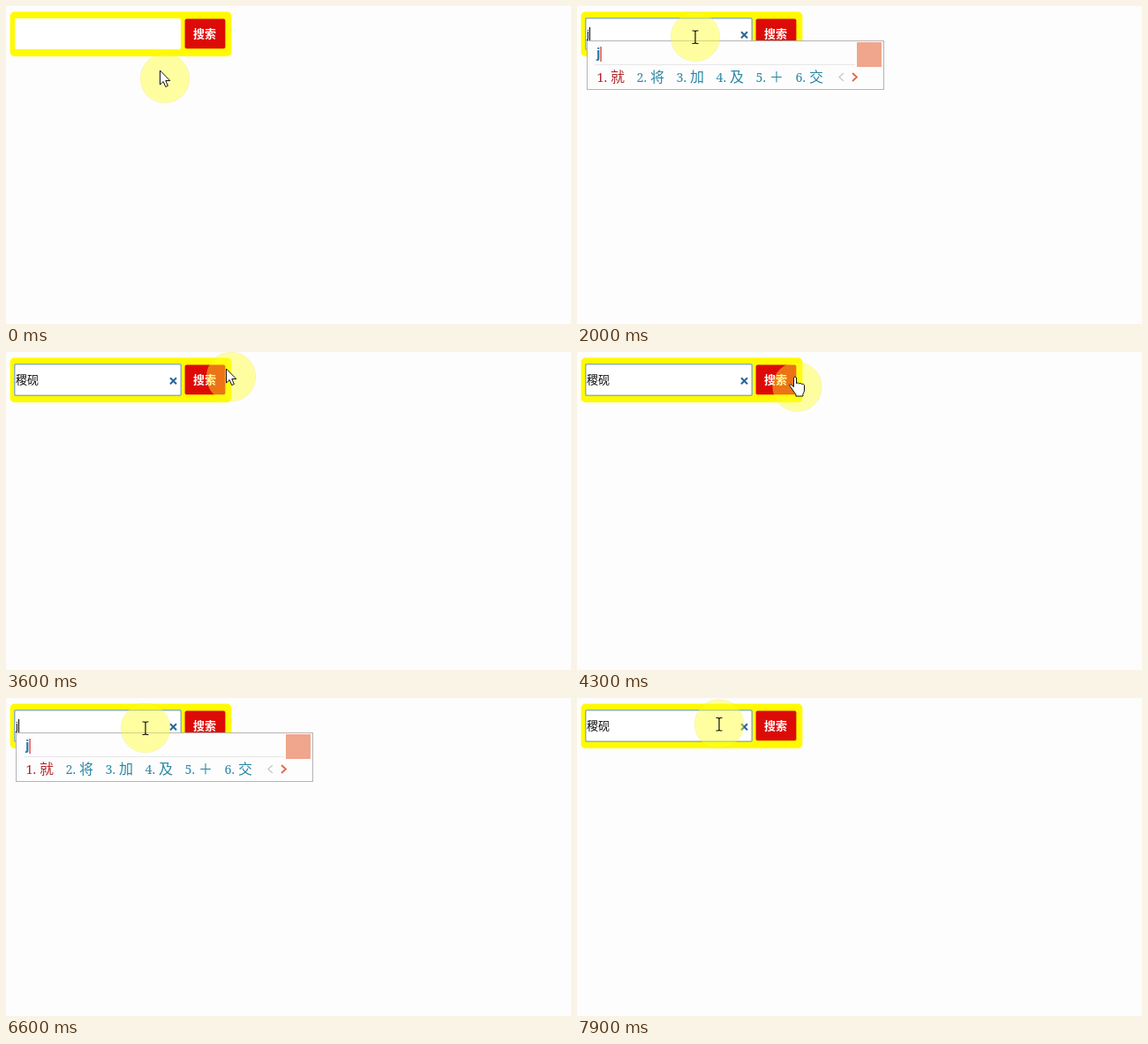
An HTML page that plays this animation: 640 by 360 pixels, repeating every 8 s.

```html
<!DOCTYPE html>
<html lang="zh">
<head>
<meta charset="utf-8">
<style>
  html, body { margin: 0; width: 100%; height: 100%; overflow: hidden; background: #fdfdfd; }
  svg { display: block; width: 100vw; height: 100vh; }
  text { font-family: "Noto Sans CJK SC", "Noto Sans CJK", sans-serif; white-space: pre; }
  .latin { font-family: "Liberation Sans", sans-serif; }
  .num { font-family: "Noto Serif", serif; font-size: 14.3px; }
  .word { font-size: 16px; font-weight: 300; }
</style>
</head>
<body>
<svg viewBox="0 0 640 360">
  <rect width="640" height="360" fill="#fdfdfd"/>
  <rect x="4.6" y="6.6" width="250.8" height="50.4" rx="5" fill="#fffa00"/>
  <rect x="10" y="14" width="188" height="35" rx="2" fill="#fff"/>
  <rect id="focus" x="9.75" y="13.75" width="188.5" height="35.5" rx="1.5" fill="none" stroke="#8fb0b8" stroke-width="1.5"/>
  <rect x="202.6" y="14.6" width="45.8" height="33.6" rx="2" fill="#dd0b08"/>
  <text x="212" y="36" font-size="13" font-weight="700" fill="#fff">搜索</text>
  <text id="value" x="11" y="36" font-size="13" fill="#111"></text>
  <path id="clear" d="M186 29.2l7 7m0-7l-7 7" stroke="#2b6596" stroke-width="2" fill="none"/>
  <rect id="caret" y="24" width="1" height="15" fill="#000"/>

  <g id="popup">
    <rect id="panel" x="11.5" y="39.5" height="55" fill="#fdfdfd" stroke="#b4b4b4"/>
    <rect id="rule" x="20" y="66" height="1" fill="#e6e6e6"/>
    <text id="typed" class="latin" x="22" y="59" font-size="16" font-weight="700" fill="#2a78ae"></text>
    <rect id="bar" y="46" width="1.2" height="17" fill="#d8281c"/>
    <g id="list"></g>
    <g id="tail" fill="none">
      <rect x="-31" y="41" width="28" height="28" fill="#efa68c"/>
      <path d="M-46 76l-5 4.5 5 4.5" stroke="#c8c8c8" stroke-width="1.3"/>
      <path d="M-36 76l5 4.5-5 4.5" stroke="#de6a48" stroke-width="1.8"/>
    </g>
  </g>

  <g id="pointer">
    <circle r="27.8" fill="#ffff28" fill-opacity=".43" stroke="#e0d860" stroke-opacity=".2"/>
    <circle id="ring" cx="-.5" cy="-3" r="6.5" fill="none" stroke="#dc9a20" stroke-width="2"/>
    <path id="arrow" d="M-5.5-9v16l3.7-3.5 2.6 6 2.6-1.1-2.6-5.9h5z" fill="#fff" stroke="#111"/>
    <path id="beam" d="M-3.5-7h2.5l1 1 1-1h2.5M0-6V6.5M-3.5 7.5h2.5l1-1 1 1h2.5" fill="none" stroke="#111" stroke-width="1.2"/>
    <path id="hand" d="M-4-10.5q1.5-2 3 0v6.5q1.7-1.5 3 .3 1.8-1 3 .5 2.2-.9 3 1.3v5.4q0 2.5-1.6 4.5v2.5h-8v-2.2q-2.2-2.4-4-5.5-2.6-3.3-3.3-4.8 1.3-2 3.3.4l1.6 1.6z" fill="#fff" stroke="#111"/>
  </g>
</svg>
<script>
const $ = id => document.getElementById(id);
const LOOP = 8000, STEP = 100;

// time, x, y of the halo centre
const path = [
  [0, 180, 82], [200, 181, 80], [800, 134, 35], [3300, 134, 35], [3600, 255, 28],
  [3700, 255, 28], [3900, 258, 36], [4300, 249.5, 39.5], [4600, 214, 36],
  [4900, 189, 28.5], [5000, 188, 30], [5200, 188, 30], [5500, 207, 36],
  [5600, 207, 36], [6200, 158, 34], [7800, 158, 34], [7900, 161, 29.5], [8000, 161, 29.5]
];

const NAME = '稷砚';
const short = { key: 'j', width: 337, words: ['就', '将', '加', '及', '＋', '交'] };
const pair = { key: 'jy', width: 433, words: [NAME, '教育', '建议', '交易', '经营', '经验'] };
const full = { key: "ji'yan", width: 541, words: [NAME, '基岩分布', '极简应用', '记言记事', '积蕴', '几眼'] };

// start time, input text, candidate popup
const stages = [
  [0, ''], [2000, 'j', short], [2200, 'jy', pair], [2500, NAME],
  [5000, ''], [6600, 'j', short], [6800, 'jy', pair], [7000, 'jiyan', full], [7300, NAME]
];
const caretOn = [[1000, 1600], [2000, 3200], [3800, 4300], [4800, 5500], [6000, 7900]];
const clicks = [[1000, 1200], [5000, 5200]];

const during = (spans, t) => spans.some(([a, b]) => t >= a && t < b);
const show = (id, on) => $(id).setAttribute('visibility', on ? 'inherit' : 'hidden');
const set = (id, name, v) => $(id).setAttribute(name, v);

function place(t) {
  const i = path.findIndex((p, n) => n && t <= p[0]);
  const [a, ax, ay] = path[i - 1], [b, bx, by] = path[i];
  const u = (t - a) / (b - a), k = u * u * (3 - 2 * u);
  return [ax + (bx - ax) * k, ay + (by - ay) * k];
}

function fillPopup({ key, width, words }) {
  let x = 22.5;
  $('list').innerHTML = words.map((w, i) => {
    const fill = i ? '#2a87a4' : '#b02428', at = x;
    x += 29 + 16 * w.length;
    return `<g fill="${fill}"><text class="num" x="${at}" y="86">${i + 1}.</text>` +
      `<text class="word" x="${at + 15.5}" y="86">${w}</text></g>`;
  }).join('');
  $('typed').textContent = key;
  set('bar', 'x', 22 + $('typed').getComputedTextLength());
  set('panel', 'width', width - 1);
  set('rule', 'width', width - 42);
  set('tail', 'transform', `translate(${11 + width})`);
}

let current = null;
function setStage(stage) {
  current = stage;
  const [, text, popup] = stage;
  $('value').textContent = text;
  set('value', 'class', popup ? 'latin' : '');
  set('caret', 'x', text ? Math.round(11 + $('value').getComputedTextLength()) : 11);
  show('clear', text);
  show('popup', popup);
  if (popup) fillPopup(popup);
}

function render(time) {
  const t = Math.floor(time % LOOP / STEP) * STEP;
  const stage = stages.filter(s => s[0] <= t).pop();
  if (stage !== current) setStage(stage);
  const [x, y] = place(t);
  const kind = y > 52 || x > 251 ? 'arrow' : x < 200 ? 'beam' : 'hand';
  for (const k of ['arrow', 'beam', 'hand']) show(k, k === kind);
  set('pointer', 'transform', `translate(${x} ${y})`);
  show('ring', during(clicks, t));
  show('caret', during(caretOn, t));
  show('focus', t >= 700);
}

const start = performance.now();
function tick() {
  render(performance.now() - start);
  requestAnimationFrame(tick);
}
tick();
</script>
</body>
</html>
```
